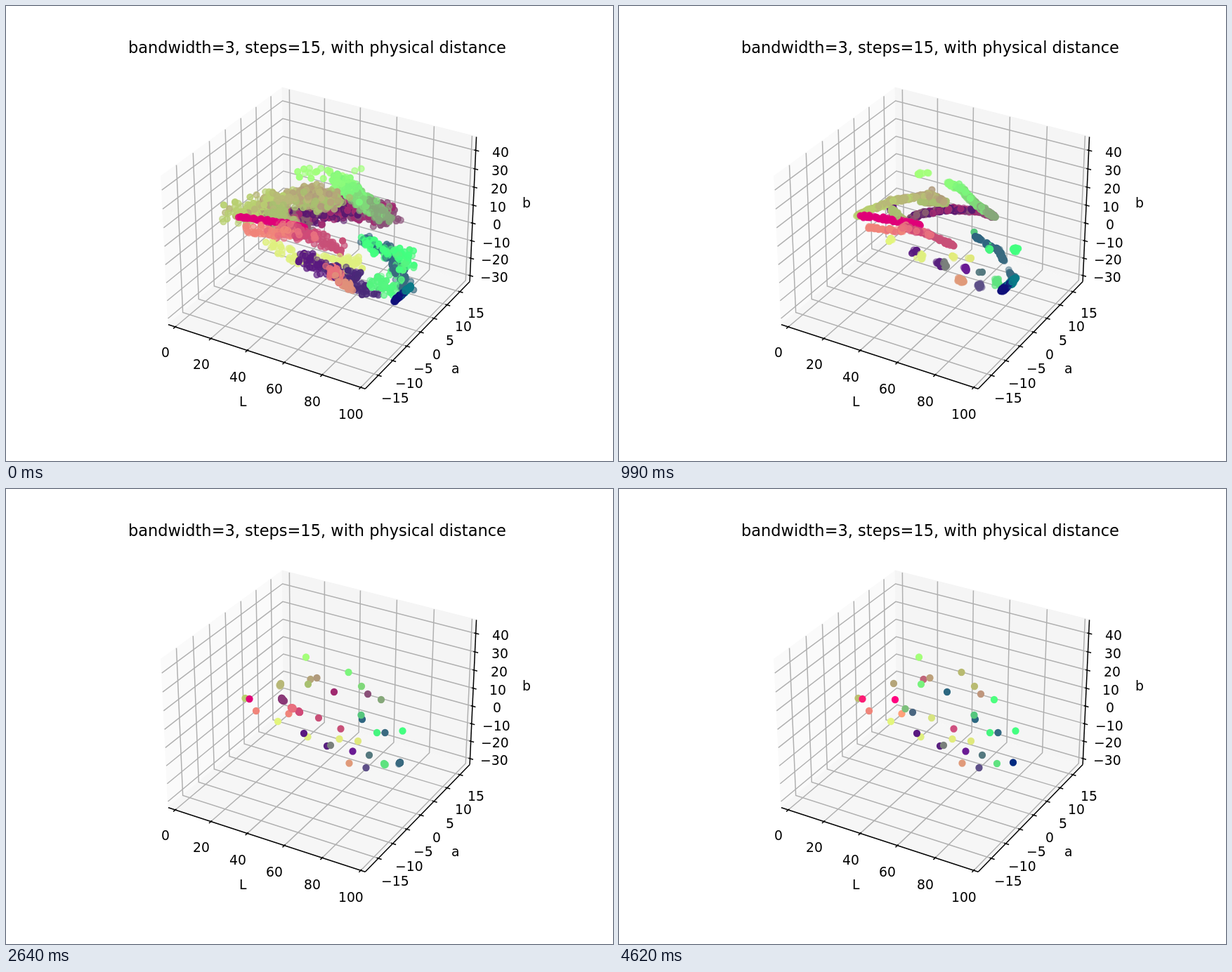
An HTML page with a canvas for the animation above (4.95 s loop, 864x648 px).

```html
<!DOCTYPE html>
<html lang="en">
<head>
<meta charset="utf-8">
<title>Mean shift clustering</title>
<style>
  html, body { margin: 0; width: 100%; height: 100%; overflow: hidden; background: #fff; }
  canvas { display: block; width: 864px; height: 648px; }
</style>
</head>
<body>
<canvas id="stage" width="864" height="648"></canvas>
<script>
const ctx = document.getElementById('stage').getContext('2d');
const STEP_MS = 330, STEPS = 15, RECOLOUR_STEP = 9;
const FONT = '"DejaVu Sans", Verdana, sans-serif';
const clamp = v => Math.max(0, Math.min(1, v));
const mix = (a, b, t) => a + (b - a) * t;

let seed = 20;
function random() {
  seed = (seed + 0x6D2B79F5) | 0;
  let t = Math.imul(seed ^ (seed >>> 15), 1 | seed);
  t = (t + Math.imul(t ^ (t >>> 7), 61 | t)) ^ t;
  return ((t ^ (t >>> 14)) >>> 0) / 4294967296;
}
const noise = () => random() + random() - 1;

// ---- Plot box: perspective view, azimuth -60, elevation 30 ----
const SIDE = 0.5952, HALF = 0.4464;
const S3 = Math.sqrt(3) / 2;

function project([x, y, z]) {
  const w = 10 - (S3 / 2 * x - 0.75 * y + 0.5 * z);
  const u = (S3 * x + 0.5 * y) / w;
  const v = (-0.25 * x + S3 / 2 * y + S3 * z) / w;
  return [193.3 + (u + 0.095) * 2697, 576.72 - (v + 0.095) * 2697];
}

function trace(points) {
  ctx.beginPath();
  points.forEach(p => ctx.lineTo(...project(p)));
}

function line(color, ...points) {
  trace(points);
  ctx.strokeStyle = color;
  ctx.stroke();
}

function pane(color, ...points) {
  trace(points);
  ctx.closePath();
  ctx.fillStyle = ctx.strokeStyle = color;
  ctx.fill();
  ctx.stroke();
}

function text(str, x, y, size = 18.75) {
  ctx.font = `${size}px ${FONT}`;
  ctx.fillText(str, Math.round(x - ctx.measureText(str).width / 2), Math.round(y));
}

const range = (from, to, by) =>
  Array.from({ length: (to - from) / by + 1 }, (_, i) => from + i * by);

// Each axis: tick values, grid line through both panes, tick mark, label anchor.
const OUT = 0.019, IN = 0.0095, PAD = 0.0988, PAD_Z = 0.0741;
const axes = [
  {
    ticks: range(0, 100, 20), at: v => -0.5504 + v * 0.011204,
    grid: p => [[p, -SIDE, -HALF], [p, SIDE, -HALF], [p, SIDE, HALF]],
    mark: p => [[p, -SIDE - OUT, -HALF], [p, -SIDE + IN, -HALF]],
    label: p => [p, -SIDE - PAD, -HALF - PAD_Z],
    edge: [[-SIDE, -SIDE, -HALF], [SIDE, -SIDE, -HALF]]
  },
  {
    ticks: range(-15, 15, 5), at: v => 0.008 + v * 0.030977,
    grid: p => [[SIDE, p, -HALF], [-SIDE, p, -HALF], [-SIDE, p, HALF]],
    mark: p => [[SIDE + OUT, p, -HALF], [SIDE - IN, p, -HALF]],
    label: p => [SIDE + PAD, p, -HALF - PAD_Z],
    edge: [[SIDE, -SIDE, -HALF], [SIDE, SIDE, -HALF]]
  },
  {
    ticks: range(-30, 40, 10), at: v => -0.0762 + v * 0.01106,
    grid: p => [[-SIDE, -SIDE, p], [-SIDE, SIDE, p], [SIDE, SIDE, p]],
    mark: p => [[SIDE + OUT, SIDE, p], [SIDE - IN, SIDE, p]],
    label: p => [SIDE + PAD, SIDE + PAD, p],
    edge: [[SIDE, SIDE, -HALF], [SIDE, SIDE, HALF]]
  }
];

function drawPlot() {
  ctx.globalAlpha = 1;
  ctx.fillStyle = '#fff';
  ctx.fillRect(0, 0, 864, 648);
  ctx.lineWidth = 1.5;
  const s = SIDE, h = HALF;
  pane('#fafafa', [-s, -s, -h], [-s, s, -h], [-s, s, h], [-s, -s, h]);
  pane('#f5f5f5', [-s, s, -h], [s, s, -h], [s, s, h], [-s, s, h]);
  pane('#f6f6f6', [-s, -s, -h], [s, -s, -h], [s, s, -h], [-s, s, -h]);
  for (const a of axes) for (const v of a.ticks) line('#b0b0b0', ...a.grid(a.at(v)));
  for (const a of axes) {
    line('#000', ...a.edge);
    ctx.fillStyle = '#000';
    for (const v of a.ticks) {
      const p = a.at(v), [x, y] = project(a.label(p));
      line('#000', ...a.mark(p));
      text(String(v).replace('-', '\u2212'), x, y + 14);
    }
  }
  text('L', 337, 570);
  text('a', 640, 523);
  text('b', 741, 287);
  text('bandwidth=3, steps=15, with physical distance', 442.6, 67, 22.5);
}

// ---- Point cloud ----
// A strand follows a few key points; a key point with a colour is a cluster mode.
// Points start scattered around the strand, thin to its curve, and after `hold`
// steps gather at the nearest mode. Without a hold they go straight to the mode.
const modes = [], particles = [];
let layer = 0;

function along(path, u) {
  const t = u * (path.length - 1), i = Math.min(path.length - 2, Math.floor(t));
  return [0, 1].map(c => mix(path[i][c], path[i + 1][c], t - i));
}

function strand(colors, count, [sx, sy], hold, ...path) {
  const palette = colors.split(' ');
  const pick = u => palette[Math.min(palette.length - 1, Math.floor(clamp(u) * palette.length))];
  path.forEach(([x, y, color], i) => {
    if (color) modes.push({ x, y, color, early: hold ? pick(i / (path.length - 1)) : color });
  });
  layer++;
  for (let i = 0; i < count; i++) {
    const u = random(), [cx, cy] = along(path, u);
    const x0 = mix(465, cx, 1.12) + noise() * sx;
    const y0 = mix(285, cy, 1.12) + noise() * sy;
    particles.push({
      x0, y0, hold,
      x1: hold ? cx + noise() * 3 : x0,
      y1: hold ? cy + noise() * 3 : y0,
      color: pick(u + noise() * 0.4),
      alpha: clamp(0.75 + noise() * 0.4),
      pace: 1 + 4 * random(),
      depth: layer + noise() * 1.5
    });
  }
}

strand('#a0ff7a', 20, [45, 14], 0, [427, 239.5, '#a4ff7a'], [470, 244]);
strand('#8a5f70 #5a1a70 #a02a70 #8a5078', 420, [30, 18], 3,
  [412, 310], [425, 297], [467, 289, '#2c6780'], [515, 292, '#bf967d'], [534, 300]);
strand('#5a0080 #8a3a78 #c0407a', 150, [20, 16], 5,
  [388, 284], [393, 300, '#ff007f'], [418, 317]);
strand('#8cfb7c #7cf57c #80d87a #86a87a', 300, [15, 13], 3,
  [468, 252], [487.5, 261, '#b8ba70'], [506, 281, '#b9bb72'], [534, 300, '#4dff7f']);
strand('#b8cf70 #b8b878 #b5a57a #b09a7c #a8c070', 480, [30, 15], 3,
  [340.5, 298, '#bcbf70'], [391, 277, '#b5a57a'], [433.5, 271, '#c0657a'],
  [442.5, 269, '#bca07a'], [465, 280], [430, 278, '#78f27d']);
strand('#a8c070 #b5a07a', 110, [20, 10], 4, [388, 290], [412, 312]);
strand('#e00078', 110, [2, 2], 3, [346.5, 299, '#fb1e76'], [395, 305], [428, 312]);
strand('#f0857a #e8707f #d04a78 #c85078', 190, [14, 10], 3,
  [356, 316, '#f0857a'], [402.5, 320, '#ffa07a'], [407.5, 313, '#7dc07c'],
  [418, 318, '#4a6680'], [445, 326, '#d7e480'], [476.5, 341.5, '#cf5080']);
strand('#dff07f', 85, [16, 12], 0, [387, 331, '#e3f57c'], [429.5, 353, '#dfef80'],
  [474.5, 356, '#e2ec7c'], [501, 359, '#dfe87c']);
strand('#5a1a80 #4a2a78', 110, [18, 12], 0, [424, 348, '#5a1a80'],
  [457, 366, '#59207f'], [493.5, 373.5, '#6a1c94'], [512.5, 397, '#5e5088']);
strand('#e8707a #e0907a', 60, [10, 8], 0, [462, 365, '#7a807c'], [488.5, 390.5, '#e09a7a']);
strand('#2f6580 #3a6a80', 110, [13, 11], 2, [507, 328, '#2c6780'],
  [539.5, 347, '#356a83'], [561, 389.5, '#002a80']);
strand('#43ff80 #55f580', 130, [15, 12], 0, [505.5, 322, '#55c67d'], [528, 347, '#46f57f'],
  [564.5, 344.5, '#43ff80'], [538, 391, '#5fe280'], [517, 379, '#55797f']);
strand('#10107a #0a7a88', 110, [2, 2], 4, [543, 406], [564, 387]);

for (const p of particles) {
  const distance = m => Math.hypot(m.x - p.x1, m.y - p.y1);
  p.mode = modes.reduce((best, m) => distance(m) < distance(best) ? m : best);
}
particles.sort((a, b) => a.depth - b.depth);

function dot(x, y, color, alpha = 1) {
  ctx.globalAlpha = alpha;
  ctx.fillStyle = ctx.strokeStyle = color;
  ctx.lineWidth = 1.9;
  ctx.beginPath();
  ctx.arc(x, y, 4.2, 0, 2 * Math.PI);
  ctx.fill();
  ctx.stroke();
}

function drawStep(step) {
  drawPlot();
  const thin = 1 - 0.4 ** step;
  if (step > 0) {
    for (const m of modes) dot(m.x, m.y, step < RECOLOUR_STEP ? m.early : m.color);
  }
  for (const p of particles) {
    const gather = clamp((step - p.hold) / p.pace);
    if (gather === 1) continue;
    const x = mix(mix(p.x0, p.x1, thin), p.mode.x, gather);
    const y = mix(mix(p.y0, p.y1, thin), p.mode.y, gather);
    dot(x, y, gather > 0.6 ? p.mode.early : p.color, p.alpha);
  }
}

let shown = -1;
function tick() {
  const step = Math.floor(performance.now() / STEP_MS) % STEPS;
  if (step !== shown) drawStep(shown = step);
  requestAnimationFrame(tick);
}
tick();
</script>
</body>
</html>
```
